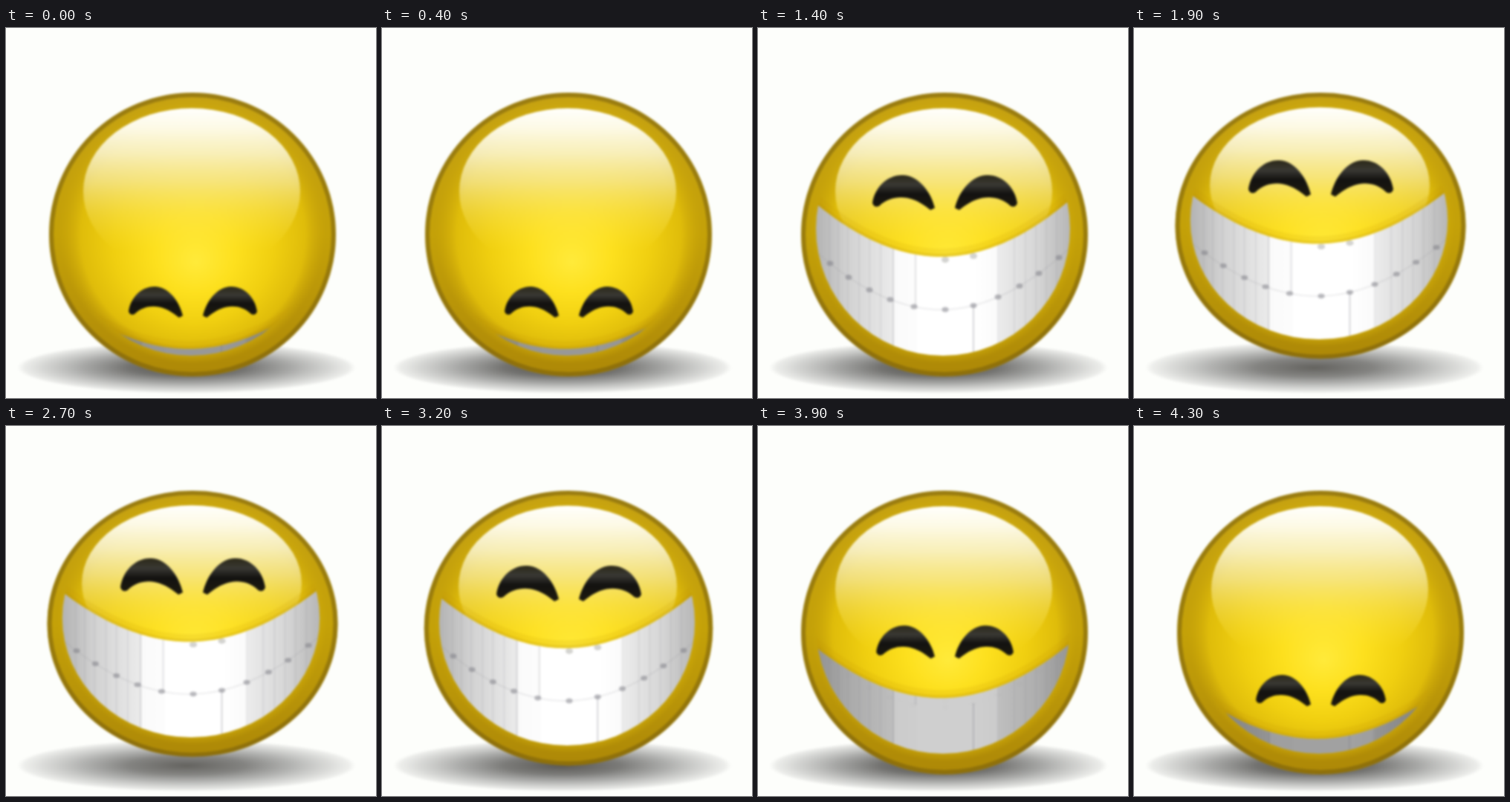
An HTML page with a canvas that plays this animation: 498x498 px, repeating every 4400 ms.

```html
<!DOCTYPE html>
<html lang="en">
<head>
<meta charset="utf-8">
<title>Grinning face</title>
<style>
  html, body { margin: 0; width: 100%; height: 100%; overflow: hidden; background: #fdfefb; }
  canvas { display: block; width: 498px; height: 498px; filter: blur(1.6px); }
</style>
</head>
<body>
<canvas id="stage" width="498" height="498"></canvas>
<script>
const ctx = document.getElementById('stage').getContext('2d');
const LOOP = 4400, STEP = 100;
const CX = 250, TOP = 87;
const clamp = v => Math.max(0, Math.min(1, v));
const mix = (a, b, k) => a + (b - a) * k;

function fillStops(gradient, stops) {
  for (const [at, color] of stops) gradient.addColorStop(at, color);
  return gradient;
}

function ellipse(x, y, rx, ry) {
  ctx.beginPath();
  ctx.ellipse(x, y, rx, ry, 0, 0, Math.PI * 2);
}

// How far the grin is open, 0 to 1.
function grin(t) {
  return t < 2400 ? clamp((t - 400) / 910) : clamp(1 - (t - 3476) / 903);
}

// Laughing bounce: the body shortens from below.
function bounce(t) {
  if (t < 1700 || t > 3300) return 0;
  return (1 - Math.cos((t - 1700) / 400 * Math.PI * 2)) / 2;
}

function drawShadow(lift) {
  ctx.save();
  ctx.translate(243, 457);
  ctx.scale(1, 0.152);
  ctx.globalAlpha = mix(1, 0.88, lift);
  ctx.fillStyle = fillStops(ctx.createRadialGradient(0, 0, 0, 0, 0, 228), [
    [0, 'rgba(40,38,34,.82)'], [0.35, 'rgba(50,49,47,.68)'],
    [0.62, 'rgba(66,66,66,.45)'], [0.85, 'rgba(90,90,90,.24)'],
    [0.96, 'rgba(110,110,110,.12)'], [1, 'rgba(120,120,120,0)']
  ]);
  ellipse(0, 0, 228, 228);
  ctx.fill();
  ctx.restore();
}

function drawBody() {
  ctx.fillStyle = fillStops(ctx.createLinearGradient(0, TOP, 0, 468), [
    [0, '#c5a112'], [0.5, '#c4a108'], [1, '#ad8807']
  ]);
  ellipse(251, 278, 193, 191);
  ctx.fill();
  ctx.lineWidth = 6;
  ctx.strokeStyle = 'rgba(112,88,14,.5)';
  ellipse(251, 278, 190, 188);
  ctx.stroke();

  ctx.fillStyle = fillStops(ctx.createRadialGradient(256, 315, 0, 251, 272, 180), [
    [0, '#ffea3a'], [0.3, '#fde01e'], [0.6, '#f0cf10'],
    [0.84, '#dfbc0a'], [1, 'rgba(205,168,8,0)']
  ]);
  ellipse(251, 272, 180, 179);
  ctx.fill();

  ctx.fillStyle = fillStops(ctx.createLinearGradient(0, 108, 0, 300), [
    [0, 'rgba(255,255,252,1)'], [0.14, 'rgba(254,252,238,.96)'],
    [0.32, 'rgba(250,244,206,.88)'], [0.52, 'rgba(247,234,158,.72)'],
    [0.72, 'rgba(250,231,110,.42)'], [1, 'rgba(255,230,60,0)']
  ]);
  ellipse(CX, 220, 146, 112);
  ctx.fill();
}

const arc = (mid, rise, x) => mid - rise * Math.pow(Math.abs(x - CX) / 172, 1.95) - (x - CX) * 0.02;

function traceArc(mid, rise) {
  for (let x = 72; x <= 428; x += 4) ctx.lineTo(x, arc(mid, rise, x));
}

function line(x, y1, y2, alpha) {
  ctx.strokeStyle = `rgba(120,120,128,${alpha})`;
  ctx.lineWidth = 2;
  ctx.beginPath();
  ctx.moveTo(x, y1);
  ctx.lineTo(x, y2);
  ctx.stroke();
}

function drawMouth(open, lift) {
  const mid = mix(432, 308, open) - 4 * lift, rise = mix(68, 75, open);
  const light = mix(152, 255, open);
  const gray = k => {
    const v = Math.round(light * k);
    return `rgb(${v},${v},${v})`;
  };

  ctx.save();
  ellipse(249, 270, 171, 171);
  ctx.clip();

  // Soft lip above the teeth.
  for (const [width, alpha] of [[22, 0.12], [8, 0.22]]) {
    ctx.beginPath();
    traceArc(mid, rise);
    ctx.lineWidth = width;
    ctx.strokeStyle = `rgba(184,140,6,${alpha})`;
    ctx.stroke();
  }

  ctx.beginPath();
  traceArc(mid, rise);
  ctx.lineTo(430, 450);
  ctx.lineTo(70, 450);
  ctx.closePath();
  ctx.clip();

  const at = x => (x - 78) / 344;
  ctx.fillStyle = fillStops(ctx.createLinearGradient(78, 0, 422, 0), [
    [0, gray(0.7)], [at(120), gray(0.82)], [at(182), gray(0.92)], [at(184), gray(0.98)],
    [at(212), gray(0.99)], [at(216), gray(1)], [at(290), gray(1)], [at(322), gray(0.98)],
    [at(325), gray(0.92)], [at(375), gray(0.84)], [1, gray(0.71)]
  ]);
  ctx.fillRect(70, 80, 360, 370);

  for (const x of [96, 108, 121, 136, 150, 165, 345, 360, 374, 388, 402]) line(x, 200, 440, 0.12);
  line(182, 200, 440, 0.2);
  line(212, 200, 375, 0.2);
  line(290, 373, 440, 0.3);
  line(323, 200, 440, 0.12);

  // Gaps between upper and lower teeth, hidden while the mouth is nearly shut.
  ctx.globalAlpha = clamp(open * 2 - 1);
  ctx.beginPath();
  traceArc(379, 82);
  ctx.lineWidth = 2;
  ctx.strokeStyle = 'rgba(150,150,155,.18)';
  ctx.stroke();
  for (const x of [97, 122, 150, 178, 210, 252, 290, 323, 352, 378, 405]) {
    ctx.fillStyle = 'rgba(125,125,132,.5)';
    ellipse(x, arc(379, 82, x), 4.5, 3.5);
    ctx.fill();
  }
  for (const x of [252, 290]) {
    ctx.fillStyle = 'rgba(130,130,120,.35)';
    ellipse(x, arc(mid, rise, x) + 4, 5, 4);
    ctx.fill();
  }
  ctx.restore();
}

// Brow-shaped eye in unit space: inner tip at x = 0, outer tip at x = 1.
function drawEye(x, y, w, h) {
  ctx.save();
  ctx.translate(x, y);
  ctx.scale(w, h);
  ctx.beginPath();
  ctx.moveTo(0, 0.96);
  ctx.bezierCurveTo(0.06, 0.5, 0.26, 0, 0.52, 0);
  ctx.bezierCurveTo(0.78, 0, 0.97, 0.4, 1, 0.82);
  ctx.quadraticCurveTo(0.97, 0.97, 0.89, 0.9);
  ctx.bezierCurveTo(0.76, 0.68, 0.6, 0.62, 0.44, 0.67);
  ctx.bezierCurveTo(0.28, 0.73, 0.17, 0.88, 0.07, 1.02);
  ctx.closePath();
  ctx.fillStyle = fillStops(ctx.createLinearGradient(0, 0, 0, 1), [
    [0, '#2b2818'], [0.28, '#393833'], [0.55, '#131210'], [1, '#1c190e']
  ]);
  ctx.fill();
  ctx.restore();
}

function draw(t) {
  const open = grin(t), squash = bounce(t);
  ctx.fillStyle = '#fdfefb';
  ctx.fillRect(0, 0, 498, 498);
  drawShadow(squash);

  ctx.save();
  ctx.translate(CX, TOP);
  ctx.scale(mix(1, 1.013, squash), mix(1, 0.938, squash));
  ctx.translate(-CX, -TOP);
  drawBody();
  drawMouth(open, squash);
  ctx.restore();

  const y = mix(348, 198, open) - 20 * squash;
  const w = mix(73, 84, open), h = mix(41, 46, open) + 2 * squash;
  drawEye(238, y, -w, h);
  drawEye(265, y, w, h);
}

function tick() {
  const t = performance.now() % LOOP;
  draw(Math.floor(t / STEP) * STEP);
  requestAnimationFrame(tick);
}
tick();
</script>
</body>
</html>
```
